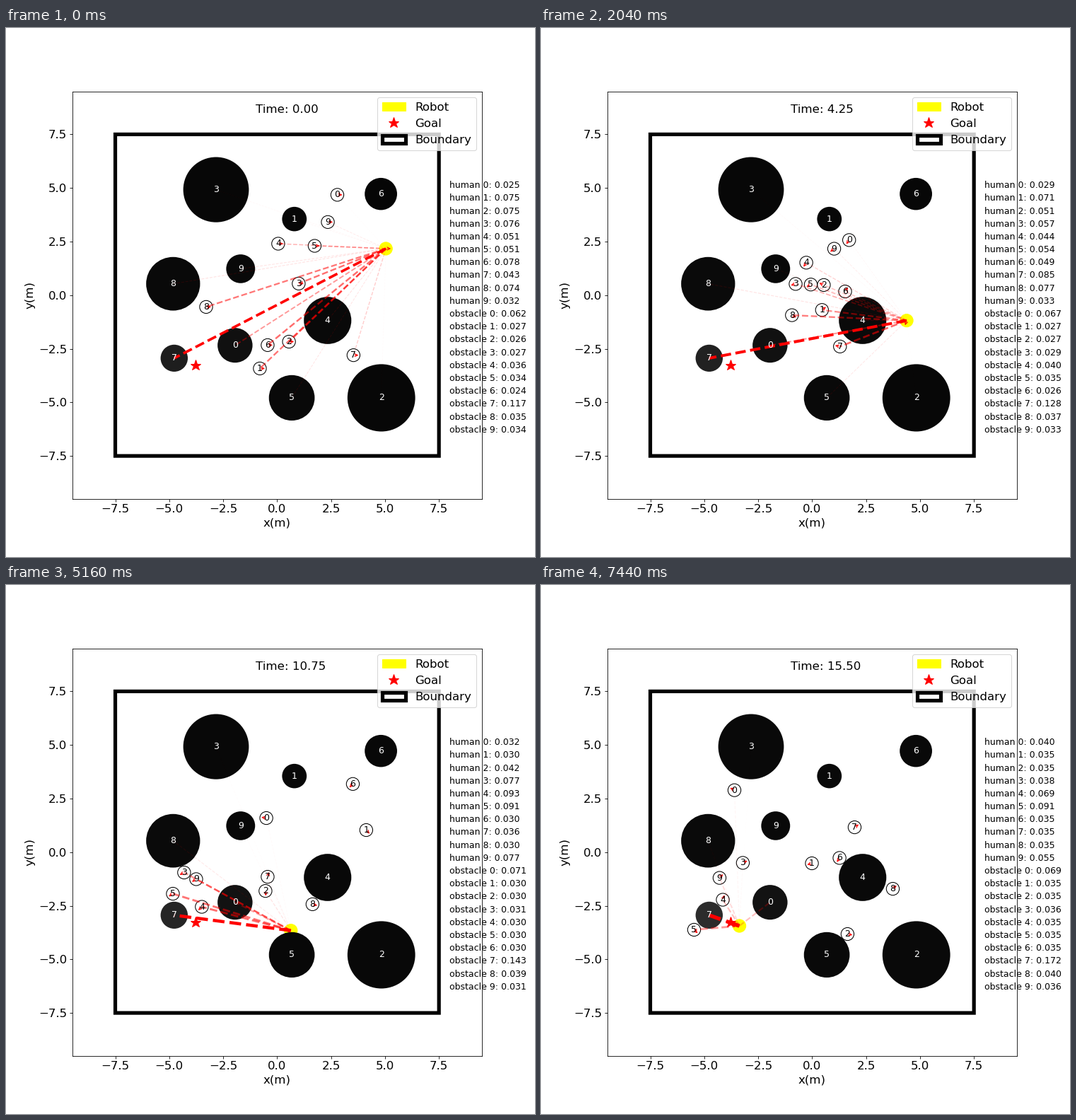
Animation, 748 px wide and 748 px high, one loop 7560 ms. Source, as a matplotlib script:

```python
import numpy as np
import matplotlib.pyplot as plt
from matplotlib.animation import FuncAnimation
from matplotlib.patches import ArrowStyle, Circle, FancyArrowPatch, Rectangle

SIZE = 748
FRAMES, INTERVAL = 63, 120
STEP = 0.25          # simulated seconds per frame
RADIUS = 0.3         # robot and humans, metres
LIMIT = 9.5
GOAL = np.array([-3.78, -3.29])

# Robot turning points: frame, x, y.
ROBOT_PATH = [(0, 5.04, 2.17), (10, 4.81, 0.16), (24, 3.95, -2.53),
              (34, 2.22, -3.51), (51, -0.77, -3.79), (62, -3.37, -3.44)]

# Each human follows one cubic curve through four points at these frames.
HUMAN_KEYS = [0, 24, 43, 62]
HUMAN_PATHS = [
    [(2.79, 4.68), (1.25, 2.02), (-0.50, 1.59), (-3.60, 2.89)],
    [(-0.80, -3.42), (1.73, 0.12), (4.13, 1.03), (-0.01, -0.52)],
    [(0.55, -2.17), (0.15, 0.34), (-0.54, -1.81), (1.64, -3.82)],
    [(1.00, 0.54), (-1.88, 0.14), (-4.31, -0.95), (-3.21, -0.50)],
    [(0.05, 2.40), (-1.04, 0.42), (-3.49, -2.55), (-4.14, -2.22)],
    [(1.74, 2.30), (-1.37, -0.19), (-4.83, -1.94), (-5.47, -3.62)],
    [(-0.44, -2.33), (2.36, 1.38), (3.51, 3.18), (1.27, -0.27)],
    [(3.54, -2.80), (0.48, -2.19), (-0.44, -1.15), (1.97, 1.16)],
    [(-3.29, -0.55), (-0.18, -1.38), (1.64, -2.43), (3.74, -1.71)],
    [(2.35, 3.41), (-0.24, 1.20), (-3.75, -1.26), (-4.29, -1.20)],
]

# Centre x, centre y, radius in metres.
OBSTACLES = np.array([
    (-1.95, -2.34, 0.81), (0.80, 3.55, 0.57), (4.83, -4.79, 1.57),
    (-2.83, 4.92, 1.52), (2.34, -1.18, 1.10), (0.68, -4.79, 1.06),
    (4.81, 4.72, 0.75), (-4.77, -2.94, 0.63), (-4.82, 0.53, 1.25),
    (-1.69, 1.23, 0.67),
])


def robot_path():
    t, x, y = np.transpose(ROBOT_PATH)
    frames = np.arange(FRAMES)
    return np.column_stack([np.interp(frames, t, x), np.interp(frames, t, y)])


def human_path(points):
    cubic = np.polyfit(HUMAN_KEYS, points, 3)
    return np.vander(np.arange(FRAMES), 4) @ cubic


def headings(path):
    """Direction of travel; everyone faces right before setting off."""
    v = np.gradient(path, axis=0)
    angle = np.arctan2(v[:, 1], v[:, 0])
    angle[0] = 0
    return angle


def attention(spot, people):
    """Share given to each human and obstacle, summing to one.

    Humans count when they lie towards the goal, obstacles mostly
    when they stand close to it.
    """
    centres = OBSTACLES[:, :2]
    rel = np.vstack([people, centres]) - spot
    ahead = GOAL - spot
    cross = ahead[0] * rel[:, 1] - ahead[1] * rel[:, 0]
    off = np.degrees(np.arctan2(cross, rel @ ahead))
    aligned = np.exp(-(off / 40) ** 2)
    near_goal = np.exp(-((centres - GOAL) ** 2).sum(axis=1) / 1.6 ** 2)
    weight = 1 + np.concatenate([2.3 * aligned[:10],
                                 0.6 * aligned[10:] + 5 * near_goal])
    return weight / weight.sum()


paths = [robot_path()] + [human_path(p) for p in HUMAN_PATHS]
angles = [headings(p) for p in paths]

fig, ax = plt.subplots(figsize=(10, 10), dpi=SIZE / 10)
ax.set_xlim(-LIMIT, LIMIT)
ax.set_ylim(-LIMIT, LIMIT)
ax.set_xticks(np.arange(-7.5, 8, 2.5))
ax.set_yticks(np.arange(-7.5, 8, 2.5))
ax.tick_params(labelsize=16)
ax.set_xlabel("x(m)", fontsize=16)
ax.set_ylabel("y(m)", fontsize=16)

boundary = ax.add_patch(Rectangle((-7.5, -7.5), 15, 15, fill=False,
                                  edgecolor="black", linewidth=5, snap=False))
goal, = ax.plot(*GOAL, "*", color="red", markersize=15)
robot = ax.add_patch(Circle((0, 0), RADIUS, color="yellow"))
ax.legend([robot, goal, boundary], ["Robot", "Goal", "Boundary"],
          loc="upper right", fontsize=16)


def add_digit(i, x, y, color):
    return ax.text(x, y, str(i), color=color, fontsize=12,
                   ha="center", va="center")


humans = [ax.add_patch(Circle((0, 0), RADIUS, fill=False)) for _ in HUMAN_PATHS]
digits = [add_digit(i, 0, 0, "black") for i in range(len(humans))]
obstacles = []
for i, (x, y, r) in enumerate(OBSTACLES):
    obstacles.append(ax.add_patch(Circle((x, y), r, linewidth=0)))
    add_digit(i, x, y, "white")

head = ArrowStyle("->", head_length=4, head_width=2)
arrows = [ax.add_patch(FancyArrowPatch((0, 0), (1, 0), color="red",
                                       arrowstyle=head)) for _ in paths]
labels = [f"{kind} {i}" for kind in ("human", "obstacle") for i in range(10)]
links = [ax.plot([], [], "--", color="red")[0] for _ in labels]
readouts = [ax.text(8, 5 - 0.6 * i, "", fontsize=12) for i in range(len(labels))]
clock = ax.text(-1, 8.5, "", fontsize=16)


def update(frame):
    spots = [p[frame] for p in paths]
    for body, spot in zip([robot] + humans, spots):
        body.center = spot
    for digit, spot in zip(digits, spots[1:]):
        digit.set_position(spot)
    for arrow, spot, angle in zip(arrows, spots, angles):
        a = angle[frame]
        tip = spot + RADIUS * np.array([np.cos(a), np.sin(a)])
        arrow.set_positions(spot, tip)

    score = attention(spots[0], spots[1:])
    strength = (score - score.min()) / (score.max() - score.min())
    ends = spots[1:] + list(OBSTACLES[:, :2])
    for i, (x, y) in enumerate(ends):
        links[i].set_data([spots[0][0], x], [spots[0][1], y])
        links[i].set_alpha(strength[i])
        links[i].set_linewidth(30 * score[i])
        readouts[i].set_text(f"{labels[i]}: {score[i]:.3f}")
    for disc, s in zip(obstacles, score[10:]):
        disc.set_facecolor((s, s, s))
    clock.set_text(f"Time: {frame * STEP:.2f}")
    return []


anim = FuncAnimation(fig, update, frames=FRAMES, interval=INTERVAL,
                     repeat=True, repeat_delay=0)
plt.show()
```
